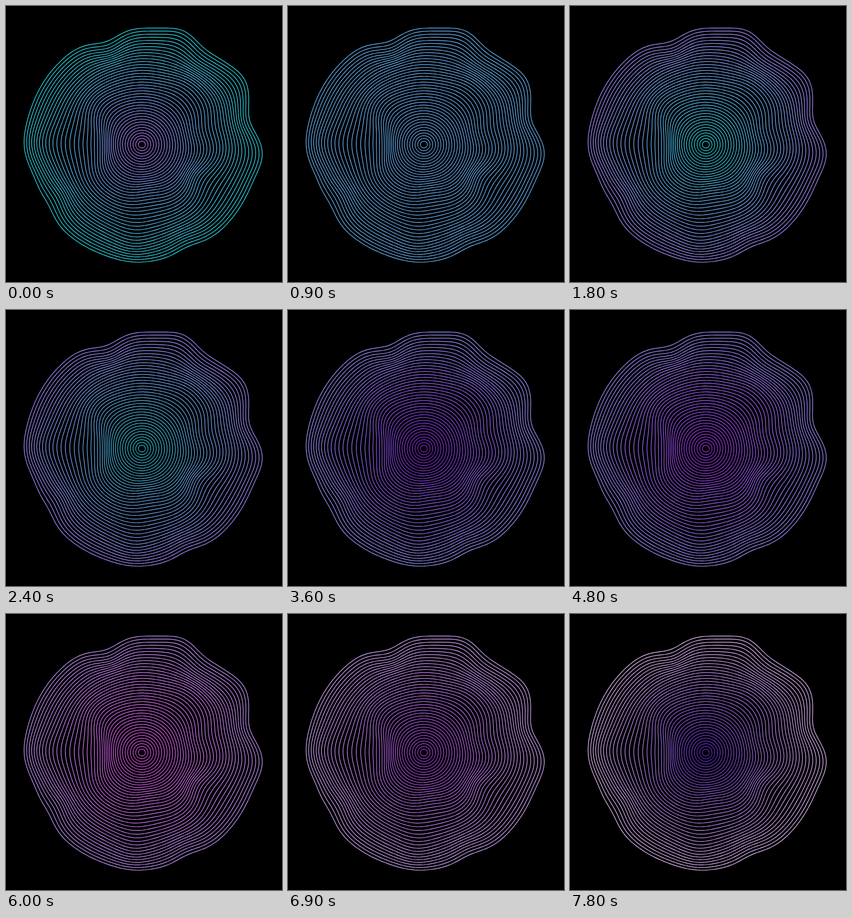
An HTML page with a canvas for the animation above (8 s loop, 480 by 480 pixels).

```html
<!DOCTYPE html>
<html>
<head>
<meta charset="utf-8">
<style>
html, body { margin: 0; height: 100%; overflow: hidden; background: #000; }
canvas { display: block; width: 100vmin; height: 100vmin; }
</style>
</head>
<body>
<canvas id="stage" width="480" height="480"></canvas>
<script>
const ctx = document.getElementById('stage').getContext('2d');
const LOOP = 8000, STEP = 300, RINGS = 40, POINTS = 240;
const CX = 236.3, CY = 241, SPREAD = 25;

const polar = (degrees, r) => {
  const a = degrees * Math.PI / 180;
  return [r * Math.cos(a), r * Math.sin(a)];
};

// Soft pushes on the rings: angle clockwise from the right, radius, height
const bumps = [
  [2, 125, 5], [5, 203, 8], [30, 130, -15], [66, 198, -8], [82, 95, -8],
  [95, 165, 7], [148, 185, -11], [163, 203, -6], [168, 97, -12], [194, 97, -12],
  [181, 165, 8], [222, 98, 6], [251, 193, -14], [290, 203, 9], [303, 185, -6],
  [308, 125, 8], [330, 130, 9], [327, 203, 9], [346, 112, -10], [347, 203, -11]
].map(([angle, r, height]) => [...polar(angle, r), height]);

// Time, inner colour, outer colour
const colours = [
  [0, [170, 118, 248], [42, 220, 234]],
  [1800, [36, 218, 234], [164, 136, 248]],
  [2400, [40, 194, 214], [160, 136, 246]],
  [3600, [128, 38, 214], [150, 146, 246]],
  [4800, [152, 46, 228], [150, 142, 244]],
  [6000, [220, 80, 230], [190, 146, 244]],
  [7800, [92, 42, 200], [222, 184, 242]]
];

const mix = (a, b, k) => a.map((v, i) => v + (b[i] - v) * k);

function ringPath(index) {
  const base = 6 + 4.7 * index + 0.0087 * index * index;
  const path = new Path2D();
  for (let p = 0; p < POINTS; p++) {
    const angle = p / POINTS * 360;
    const [x, y] = polar(angle, base);
    const push = bumps.reduce((sum, [bx, by, height]) =>
      sum + height * Math.exp(-((x - bx) ** 2 + (y - by) ** 2) / (2 * SPREAD ** 2)), 0);
    const [px, py] = polar(angle, base + push);
    path.lineTo(CX + px, CY + py);
  }
  path.closePath();
  return path;
}

const rings = Array.from({ length: RINGS }, (_, i) => ringPath(i));

function draw(now) {
  const time = Math.floor(now % LOOP / STEP) * STEP;
  const next = Math.max(1, colours.findIndex(c => c[0] >= time));
  const [t0, in0, out0] = colours[next - 1], [t1, in1, out1] = colours[next];
  const k = (time - t0) / (t1 - t0);
  const inside = mix(in0, in1, k), outside = mix(out0, out1, k);
  ctx.fillStyle = '#000';
  ctx.fillRect(0, 0, 480, 480);
  ctx.lineWidth = 1.2;
  rings.forEach((path, i) => {
    ctx.strokeStyle = `rgb(${mix(inside, outside, i / (RINGS - 1)).map(Math.round)})`;
    ctx.stroke(path);
  });
}

const start = performance.now();
function frame() {
  draw(performance.now() - start);
  requestAnimationFrame(frame);
}
frame();
</script>
</body>
</html>
```
